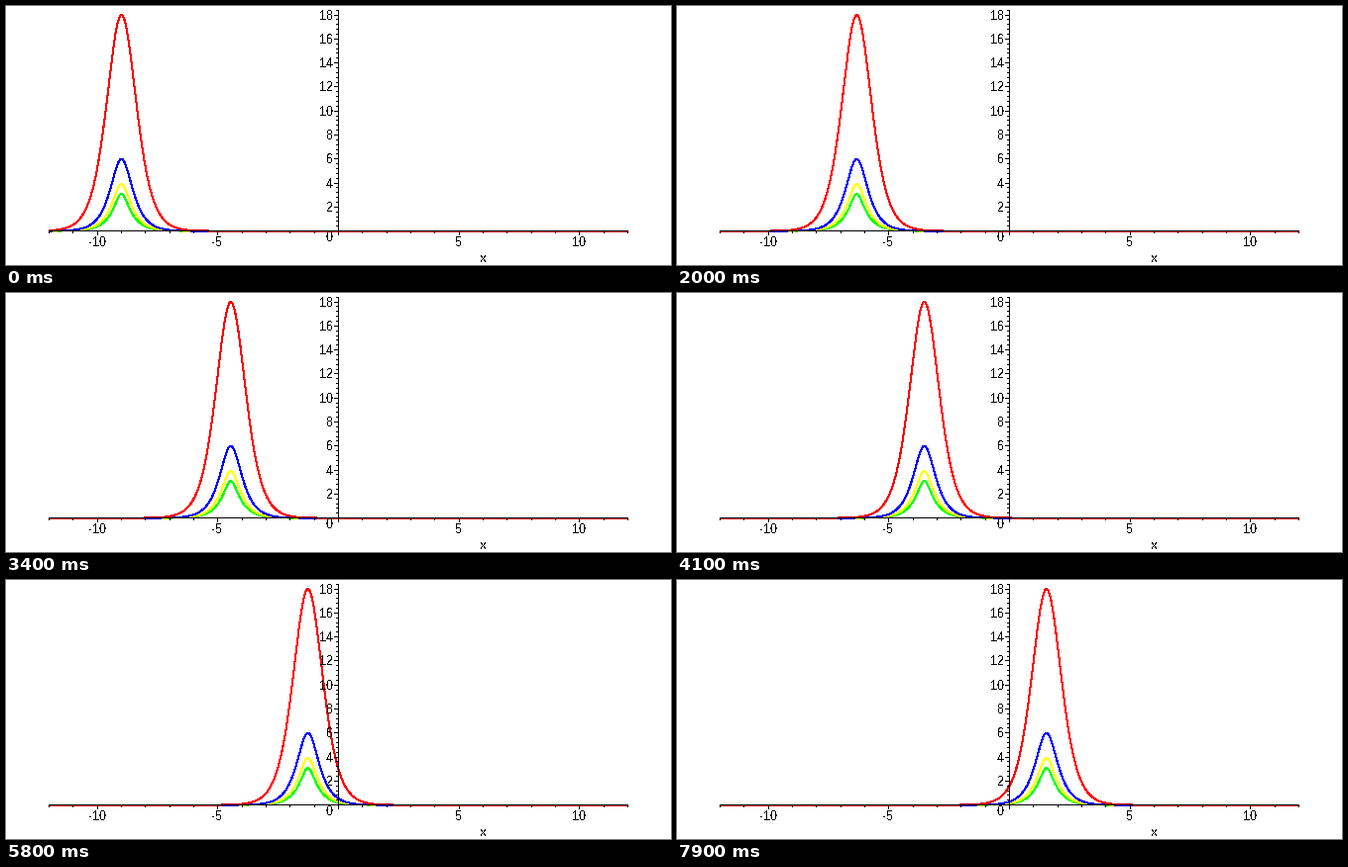
These frames come from a looping animation (671x262 px, 8 s). A matplotlib script:

```python
import numpy as np
import matplotlib.pyplot as plt
from matplotlib.animation import FuncAnimation

W, H, DPI = 671, 262, 64
PX = 72 / DPI                    # one pixel in points
X0, SX = 335, 584 / 24           # x axis: origin column, pixels per unit
Y0, SY = 227, 12.14              # y axis: origin row, pixels per unit
FRAMES, INTERVAL = 80, 100
C = 6                            # wave speed
T0, DT = -1.5, 3 / 135

plt.rcParams.update({
    "font.family": "Liberation Sans",
    "text.antialiased": False,
    "text.hinting": "native",
    "text.hinting_factor": 1,
})

fig = plt.figure(figsize=(W / DPI, H / DPI), dpi=DPI, facecolor="white")
ax = fig.add_axes([0, 0, 1, 1])
ax.set_xlim(0, W)
ax.set_ylim(H, 0)
ax.axis("off")


def col(x):
    return int(np.floor(X0 + SX * x + 0.5))


def row(y):
    return int(np.floor(Y0 + 0.15 - SY * y + 0.5))


def stroke(xs, ys):
    ax.plot(xs, ys, color="black", lw=PX, snap=False,
            solid_capstyle="butt", zorder=8)


def hline(x1, x2, y):
    stroke([x1, x2 + 1], [y + 0.5] * 2)


def vline(x, y1, y2):
    stroke([x + 0.5] * 2, [y1, y2 + 1])


def label(x, y, s, ha="center"):
    ax.text(x, y, s, ha=ha, va="baseline", fontsize=13 * PX,
            color="black", zorder=9)


def soliton(u, p):
    """Solitary wave of the generalised KdV equation with nonlinearity u^p."""
    amp = ((p + 1) * (p + 2) * C / 2) ** (1 / p)
    return amp * np.cosh(p * np.sqrt(C) / 2 * u) ** (-2 / p)


# Axes with major and minor ticks
hline(col(-12), col(12), Y0)
vline(X0, 4, Y0 + 4)
for k in range(-12, 13):
    vline(col(k), Y0, Y0 + (4 if k % 5 == 0 else 2))
for k in range(47):
    hline(X0 - (4 if k % 5 == 0 else 2), X0, row(0.4 * k))

for k in (-10, -5, 5, 10):
    label(col(k), 243, str(k))
for k in range(2, 19, 2):
    label(330, row(k) + 5, str(k), "right")
label(330, 238, "0", "right")
label(481.5, 259, "x")

# Waves, steepest nonlinearity at the back.
# Without antialiasing every touched pixel is lit, so one pixel draws as two.
x = np.linspace(-12, 12, 1169)
waves = []
for p, color in ((4, "#00ff00"), (3, "#ffff00"), (2, "#0000ff"), (1, "#ff0000")):
    line, = ax.plot([], [], color=color, lw=PX, antialiased=False, snap=False,
                    solid_capstyle="butt", zorder=6 - p)
    waves.append((p, line))


def update(i):
    u = x - C * (T0 + DT * i)
    for p, line in waves:
        line.set_data(X0 + 0.5 + SX * x, Y0 + 0.65 - SY * soliton(u, p))
    return [line for _, line in waves]


anim = FuncAnimation(fig, update, frames=FRAMES, interval=INTERVAL,
                     repeat=True, repeat_delay=0, blit=False)
plt.show()
```
